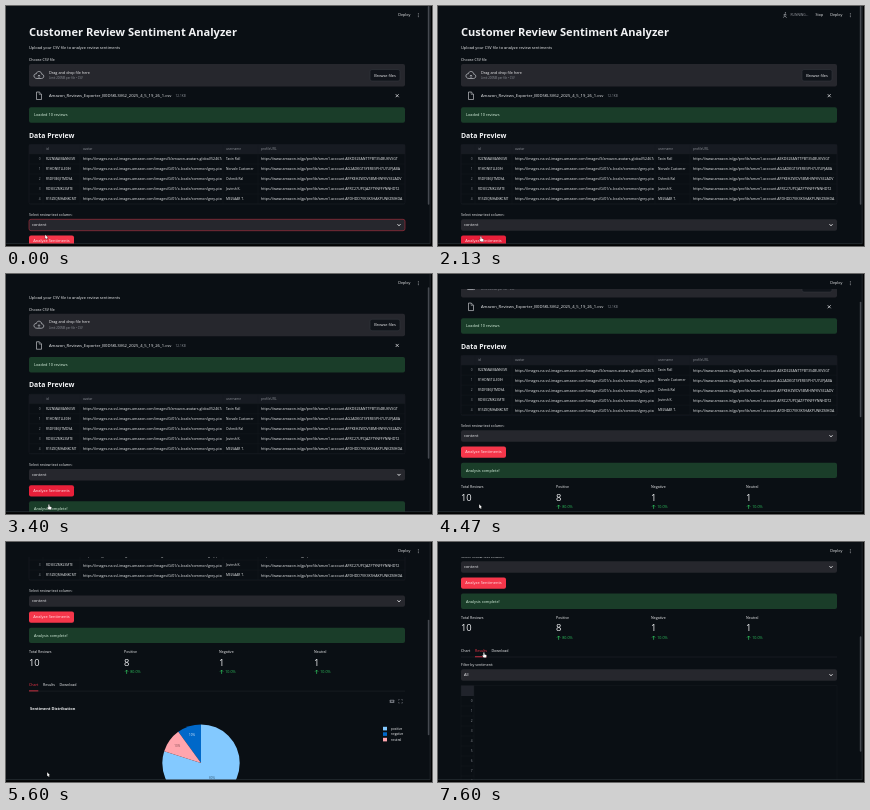
Animation, 426 px wide and 240 px high, one loop 7670 ms. Source, as an HTML page with a canvas:

```html
<!DOCTYPE html>
<html lang="en">
<head>
<meta charset="utf-8">
<title>Review sentiment dashboard</title>
<style>
  html, body { margin: 0; width: 100%; height: 100%; overflow: hidden; background: #0a0f14; }
  canvas { display: block; width: 426px; height: 240px; }
</style>
</head>
<body>
<canvas id="stage"></canvas>
<script>
const W = 426, H = 240, LOOP = 7670, STEP = LOOP / 115;
const LEFT = 23, RIGHT = 399, HEADER = 15, BOTTOM = 238;
const BG = '#0a0f14', PANEL = '#26272d', LINE = '#22262d', GRID = '#181c22', TEXT = '#f2f3f5',
      DIM = '#8d9198', RED = '#f5364a', PRESSED = '#e8203a', GREEN = '#1a3d29', UP = '#2fc45f';
const FONT = '"Open Sans", "Noto Sans", sans-serif';

const RUN_START = 340, RUN_END = 3260, DONE = 3190, TAB_CLICK = 7460, LEAVE_CHART = 6930;
const MOUSE_OFF = 3450;
const SCROLL = [[3190, 0], [3400, 18], [3600, 53], [3920, 53], [4000, 55], [4420, 55],
  [4470, 57], [4530, 58], [4670, 60], [4930, 103], [5200, 138], [5400, 150], [5460, 151],
  [5700, 166], [6000, 183], [6130, 191], [6520, 191], [6600, 194]];
const MOUSE_X = [[270, 40], [400, 43], [3420, 43], [3600, 42], [6870, 42], [7200, 46]];
const MOUSE_Y = [[270, 230], [400, 232], [3420, 232], [3600, 231.5], [6870, 231.5], [7200, 112]];

const AVATAR = 'https://images-na.ssl-images-amazon.com/images/';
const GREY = AVATAR + 'G/01/x-locale/common/grey-pixel.gif';
const PROFILE = 'https://www.amazon.in/gp/profile/amzn1.account.';
const ROWS = [
  ['R2ZNMAE8ANN3VE', AVATAR + 'S/amazon-avatars-global/52467a', 'Tavin Roll', 'AEKDE2EANTTPBT3S4BUKVSGT'],
  ['R1HDNSTLLE0IH', GREY, 'Norvale Customer', 'AG2ADKGTSYERESPH7U7UPJABA'],
  ['R5DF0E6JITMD9A', GREY, 'Oshmik Ral', 'AFPKEHZWOVSBMHWFKVSE2ADV'],
  ['RDSECZMKLSMTE', GREY, 'Jovinsh K.', 'AFRC27UPCJAZFTYNFFYNNHDT2'],
  ['R1SZEQMHANKCMT', GREY, 'MELVAAR T.', 'AFDHDD7VK3KSHAKPUNKZMHDA'],
];

const canvas = document.getElementById('stage');
const ctx = canvas.getContext('2d');
const dpr = window.devicePixelRatio || 1;
canvas.width = W * dpr;
canvas.height = H * dpr;

function track(points, t) {
  if (t <= points[0][0]) return points[0][1];
  for (let i = 1; i < points.length; i++) {
    const [t0, a] = points[i - 1], [t1, b] = points[i];
    if (t <= t1) return a + (b - a) * (t - t0) / (t1 - t0);
  }
  return points[points.length - 1][1];
}

function text(str, x, y, size, color = TEXT, weight = 500, align = 'left') {
  ctx.font = `${weight} ${size}px ${FONT}`;
  ctx.textAlign = align;
  ctx.textBaseline = 'alphabetic';
  ctx.fillStyle = color;
  ctx.fillText(str, x, y + size * 0.35);
}

function box(x, y, w, h, fill, radius = 0, stroke) {
  ctx.beginPath();
  ctx.roundRect(x, y, w, h, radius);
  if (fill) { ctx.fillStyle = fill; ctx.fill(); }
  if (stroke) { ctx.strokeStyle = stroke; ctx.lineWidth = 0.6; ctx.stroke(); }
}

function path(points, color, width = 0.7) {
  ctx.beginPath();
  points.forEach(([x, y], i) => i ? ctx.lineTo(x, y) : ctx.moveTo(x, y));
  ctx.strokeStyle = color;
  ctx.lineWidth = width;
  ctx.stroke();
}

function clipped(x, y, w, h, draw) {
  ctx.save();
  ctx.beginPath();
  ctx.rect(x, y, w, h);
  ctx.clip();
  draw();
  ctx.restore();
}

function success(label, y) {
  box(LEFT, y - 7.7, RIGHT - LEFT, 15.4, GREEN, 2);
  text(label, 28, y, 3.9, '#dcf5e3');
}

function select(label, value, y, focused) {
  text(label, LEFT, y - 10, 3.6);
  box(LEFT, y - 5.7, RIGHT - LEFT, 11.4, PANEL, 2, focused && '#b5303e');
  text(value, 26, y, 4);
  path([[391.5, y - 0.8], [393, y + 0.8], [394.5, y - 0.8]], TEXT, 0.9);
}

function uploader() {
  text('Choose CSV file', LEFT, 54, 3.6);
  box(LEFT, 58, RIGHT - LEFT, 22.5, PANEL, 2);
  ctx.beginPath();
  ctx.moveTo(31, 72.5);
  ctx.bezierCurveTo(27, 72.5, 27, 67.5, 30.3, 67.8);
  ctx.bezierCurveTo(31, 64.4, 35.5, 64.8, 35.8, 68.3);
  ctx.bezierCurveTo(38.6, 68.2, 38.4, 72.5, 35.5, 72.5);
  ctx.closePath();
  ctx.strokeStyle = '#b4b6bc';
  ctx.lineWidth = 0.8;
  ctx.stroke();
  path([[33, 72], [33, 69]], '#b4b6bc');
  path([[31.8, 70.2], [33, 69], [34.2, 70.2]], '#b4b6bc');
  text('Drag and drop file here', 43, 66.3, 3.8);
  text('Limit 200MB per file • CSV', 43, 72.3, 2.8, DIM);
  box(364, 63.5, 30, 11.5, '#10141a', 2, '#33363d');
  text('Browse files', 379, 69.3, 3.9, TEXT, 500, 'center');

  path([[30.5, 86], [33.3, 86], [35.5, 88.2], [35.5, 93.5], [30.5, 93.5], [30.5, 86]], '#c0c2c6');
  path([[33.2, 86], [33.2, 88.4], [35.5, 88.4]], '#c0c2c6', 0.5);
  text('Amazon_Reviews_Exporter_B0D5KLSV62_2025_4_5_19_26_1.csv', 43, 89.8, 4.15);
  text('12.1KB', 169.5, 89.9, 3.2, DIM);
  path([[389.7, 88.2], [392.7, 91.2]], TEXT);
  path([[392.7, 88.2], [389.7, 91.2]], TEXT);
}

function preview() {
  text('Data Preview', LEFT, 129.1, 6.9, TEXT, 700);
  const top = 138.5, bottom = 198;
  const cols = [[37, 'id', 3.25], [74, 'avatar', 3.6], [217, 'username', 3.25], [252, 'profileURL', 3.6], [RIGHT]];
  box(LEFT, top, RIGHT - LEFT, 9.5, '#171b22');
  for (let y = 148; y <= bottom; y += 10) path([[LEFT, y], [RIGHT, y]], GRID, 0.4);
  for (let c = 0; c < 4; c++) {
    const [x, name, size] = cols[c], width = cols[c + 1][0] - x;
    path([[x, top], [x, bottom]], GRID, 0.4);
    text(name, x + 3, 143.2, 3.2, DIM);
    clipped(x, top, width - 1, bottom - top, () => ROWS.forEach((row, i) =>
      text(c === 3 ? PROFILE + row[3] : row[c], x + 3, 153.2 + i * 10, size, '#eceef0')));
  }
  ROWS.forEach((row, i) => text(i, 34.5, 153.2 + i * 10, 3.2, DIM, 500, 'right'));
  box(LEFT, top, RIGHT - LEFT, bottom - top, null, 1.5, GRID);
}

function metrics() {
  const items = [['Total Reviews', 10], ['Positive', 8, '80.0%'], ['Negative', 1, '10.0%'], ['Neutral', 1, '10.0%']];
  items.forEach(([label, value, delta], i) => {
    const x = LEFT + i * 95;
    text(label, x, 269.3, 3.6);
    text(value, x, 280.2, 9.4, TEXT, 400);
    if (!delta) return;
    path([[x + 2.6, 291.8], [x + 2.6, 288]], UP);
    path([[x + 1.1, 289.5], [x + 2.6, 288], [x + 4.1, 289.5]], UP);
    text(delta, x + 6.2, 289.9, 3.7, UP);
  });
}

function tabs(active) {
  path([[LEFT, 309], [RIGHT, 309]], LINE, 0.5);
  [['Chart', 23, 9.3], ['Results', 37, 12], ['Download', 53.5, 17]].forEach(([name, x, w], i) => {
    text(name, x, 303, 3.6, i === active ? RED : TEXT);
    if (i === active) box(x, 308.4, w, 0.8, RED);
  });
}

function chart(hovered) {
  text('Sentiment Distribution', 24, 326.7, 3.95, TEXT, 700);
  if (hovered) {
    box(383.7, 317.6, 4.6, 3.4, '#6d7178', 0.5);
    box(385.2, 318.4, 1.6, 1.6, BG, 0.8);
    for (const sx of [-1, 1]) for (const sy of [-1, 1])
      path([[394.5 + sx * 0.8, 319.2 + sy * 1.8], [394.5 + sx * 1.9, 319.2 + sy * 1.8],
        [394.5 + sx * 1.9, 319.2 + sy * 0.7]], '#6d7178', 0.6);
  }
  const cx = 195, cy = 381, r = 38.7;
  // Each slice: name, start and end as turns from the top, fill, label colour.
  const slices = [['positive', 0, 0.8, '#83c9ff', '#355a75'], ['negative', 0.9, 1, '#0068c9', '#e5f1ff'],
    ['neutral', 0.8, 0.9, '#ffa5ad', '#7c4a50']];
  slices.forEach(([name, from, to, color, ink], i) => {
    const [a, b] = [from, to].map(turn => (turn - 0.25) * Math.PI * 2), mid = (a + b) / 2;
    ctx.beginPath();
    ctx.moveTo(cx, cy);
    ctx.arc(cx, cy, r, a, b);
    ctx.fillStyle = color;
    ctx.fill();
    const d = r * (i ? 0.76 : 0.48);
    text(Math.round((to - from) * 100) + '%', cx + Math.cos(mid) * d, cy + Math.sin(mid) * d, 3, ink, 500, 'center');
    const y = 346.5 + i * 5.5;
    box(377, y - 1.8, 4, 3.6, color);
    text(name, 385, y, 3.1);
  });
}

function results() {
  select('Filter by sentiment:', 'All', 327);
  box(LEFT, 337.5, 13, 10.5, '#20232b');
  path([[LEFT, 337.5], [RIGHT, 337.5]], GRID, 0.4);
  for (const x of [LEFT, 36, RIGHT]) path([[x, 337.5], [x, 440]], GRID, 0.4);
  for (let i = 0; i < 9; i++) {
    text(i, 34.5, 353 + i * 10, 3.2, DIM, 500, 'right');
    path([[LEFT, 358 + i * 10], [36, 358 + i * 10]], GRID, 0.4);
  }
}

function page(t) {
  text('Customer Review Sentiment Analyzer', LEFT, 26.2, 11.1, TEXT, 700);
  text('Upload your CSV file to analyze review sentiments', LEFT, 42, 3.95);
  uploader();
  success('Loaded 10 reviews', 109);
  preview();
  select('Select review text column:', 'content', 219, t < RUN_START);
  box(LEFT, 229.5, 45, 11.2, t > RUN_START && t < MOUSE_OFF ? PRESSED : RED, 2);
  text('Analyze Sentiments', 45.5, 235, 4, '#ffe9eb', 500, 'center');
  if (t < DONE) return;
  success('Analysis complete!', 253.3);
  metrics();
  const showResults = t >= TAB_CLICK;
  tabs(showResults ? 1 : 0);
  if (showResults) results();
  else chart(t > 5500 && t < LEAVE_CHART);
}

function runner(frame) {
  const s = [1.6, 0.6, -0.8, 0.4][(frame >> 1) % 4], x = 347, y = 9, c = '#a8abb1';
  box(x - 0.2, y - 2.8, 1.3, 1.3, c, 0.65);
  path([[x, y - 1], [x - 0.2, y + 0.8], [x + s, y + 2.8]], c);
  path([[x - 0.2, y + 0.8], [x - s, y + 2.6]], c);
  path([[x - s, y], [x, y - 0.9], [x + s, y]], c, 0.6);
}

function header(t, frame) {
  box(0, 0, W, HEADER, BG);
  text('Deploy', 392.3, 9, 3.7);
  for (let i = -1; i <= 1; i++) box(411.8, 8.6 + i * 1.7, 0.9, 0.9, TEXT, 0.45);
  if (t < RUN_START || t >= RUN_END) return;
  runner(frame);
  text('RUNNING...', 352.5, 9, 3.3, '#9a9da4');
  text('Stop', 377.5, 9, 3.6);
}

function scrollbar(t, scroll) {
  const height = t < DONE ? 285 : t < MOUSE_OFF ? 330 : 490;
  box(421.8, scroll * BOTTOM / height, 1.6, BOTTOM * BOTTOM / height, '#454950', 0.8);
}

function windowEdge() {
  box(0, BOTTOM, W, 2, '#020304');
  box(424, 0, 2, H, '#020304');
  path([[0, 237.7], [424.2, 237.7], [424.2, 0]], '#30363b', 0.7);
}

function cursor(t) {
  const hand = (t > RUN_START && t < MOUSE_OFF) || t > 7150;
  const shape = hand
    ? [[-0.6, -1.5], [0.4, -1.5], [0.4, 0.4], [2.5, 0.9], [2.2, 3.5], [-0.4, 3.5], [-1.8, 1.2], [-0.6, 1.4]]
    : [[-0.8, -1.2], [-0.8, 2.8], [0.1, 2], [0.8, 3.4], [1.4, 3.1], [0.8, 1.8], [2, 1.7]];
  ctx.save();
  ctx.translate(track(MOUSE_X, t), track(MOUSE_Y, t));
  ctx.beginPath();
  shape.forEach(([x, y]) => ctx.lineTo(x, y));
  ctx.closePath();
  ctx.fillStyle = '#fff';
  ctx.strokeStyle = '#111';
  ctx.lineWidth = 0.5;
  ctx.stroke();
  ctx.fill();
  ctx.restore();
}

function draw(now) {
  const frame = Math.floor(((now % LOOP) + 7) / STEP) % 115;
  const t = frame * STEP;
  const scroll = track(SCROLL, t);
  ctx.setTransform(dpr, 0, 0, dpr, 0, 0);
  box(0, 0, W, H, BG);
  clipped(0, HEADER, W, BOTTOM - HEADER, () => {
    ctx.translate(0, -scroll);
    page(t);
  });
  header(t, frame);
  scrollbar(t, scroll);
  windowEdge();
  cursor(t);
}

function tick(now) {
  draw(now);
  requestAnimationFrame(tick);
}
requestAnimationFrame(tick);
</script>
</body>
</html>
```
